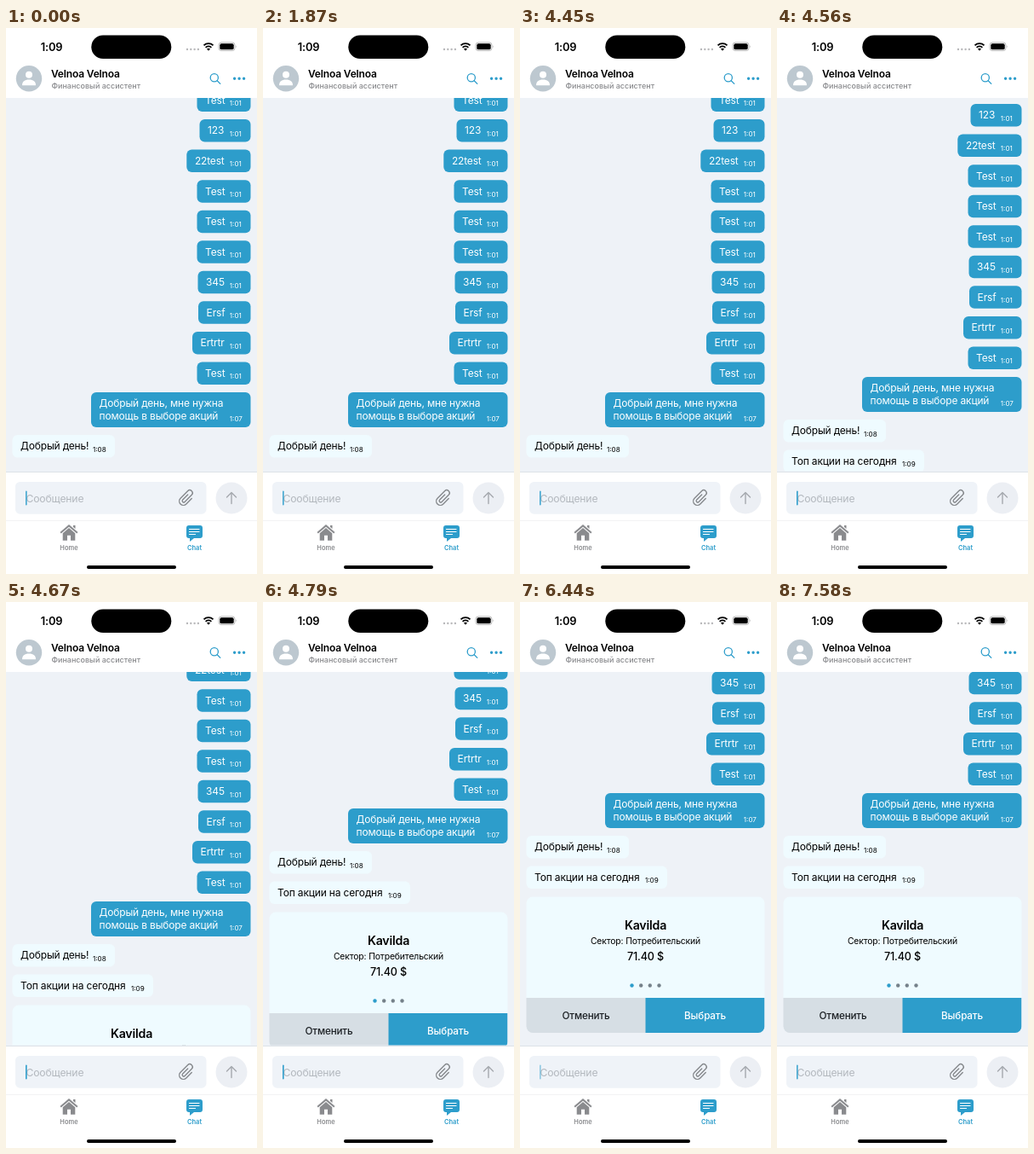
These frames come from a looping animation (295x640 px, 8 s). An HTML page:

```html
<!DOCTYPE html>
<html lang="ru">
<head>
<meta charset="utf-8">
<title>Chat</title>
<style>
  html, body { margin: 0; width: 100%; height: 100%; overflow: hidden; background: #fff; }
  svg { display: block; width: 295px; height: 640px; }
  text { font: 12px Inter, sans-serif; letter-spacing: -.014em; }
  .time { font-size: 8.1px; letter-spacing: 0; }
  .tab { font-size: 7.5px; font-weight: 600; letter-spacing: 0; }
  .mid { text-anchor: middle; }
  .medium { font-weight: 500; }
  .bold { font-weight: 600; }
  .blue { fill: #2d9dcb; }
  .pale { fill: #effbff; }
  .white { fill: #fff; }
  .grey { fill: #8a8b8e; }
  .line { fill: none; stroke-linecap: round; stroke-linejoin: round; }
</style>
</head>
<body>
<svg viewBox="0 0 295 640">
  <defs>
    <clipPath id="view"><rect y="82" width="295" height="437.5"/></clipPath>
    <clipPath id="card"><rect x="7.5" y="548.5" width="280" height="159.5" rx="7.5"/></clipPath>
  </defs>

  <rect y="82" width="295" height="438" fill="#eef2f7"/>
  <g clip-path="url(#view)">
    <g id="chat">
      <g id="bubbles"></g>
      <g id="reply">
        <g id="replyBubble"></g>
        <g clip-path="url(#card)">
          <rect class="pale" x="7" y="548" width="281" height="119"/>
          <rect x="7" y="667" width="141" height="41" fill="#d6dee4"/>
          <rect class="blue" x="147.5" y="667" width="140" height="41"/>
        </g>
        <g class="mid">
          <text class="bold" x="147.5" y="586.7" style="font-size:14.2px">Kavilda</text>
          <text x="147.5" y="604.2" style="font-size:10.4px">Сектор: Потребительский</text>
          <text class="medium" x="147.5" y="623" style="font-size:12.6px">71.40 $</text>
          <text class="medium" x="77.5" y="691.8" fill="#1b1f23" style="font-size:11.7px">Отменить</text>
          <text class="medium white" x="217.5" y="691.8" style="font-size:11.7px">Выбрать</text>
        </g>
        <g fill="#75818a">
          <circle class="blue" cx="131.5" cy="652.5" r="2.2"/>
          <circle cx="142.2" cy="652.5" r="2.2"/>
          <circle cx="152.8" cy="652.5" r="2.2"/>
          <circle cx="163.5" cy="652.5" r="2.2"/>
        </g>
      </g>
    </g>
  </g>

  <!-- Status bar -->
  <text class="bold" x="40.8" y="26.5" style="font-size:12.9px">1:09</text>
  <rect x="100.3" y="8.5" width="94" height="27.5" rx="13.75"/>
  <path class="line" d="M213 25h13" stroke="#b9b9bb" stroke-width="2.4" stroke-dasharray="0 4.3"/>
  <path d="M232.5 20.4a8 8 0 0 1 11 0M234.6 22.8a5 5 0 0 1 6.8 0" fill="none" stroke="#000" stroke-width="1.8"/>
  <path d="M236 24.6a3 3 0 0 1 4 0l-2 2.2z"/>
  <rect x="250" y="17" width="19" height="9.6" rx="3" fill="none" stroke="#aaa" stroke-width=".8"/>
  <rect x="251.3" y="18.3" width="16.4" height="7" rx="1.9"/>
  <path d="M270.3 20.2q1.4 1.6 0 3.2z" fill="#aaa"/>

  <!-- Header -->
  <circle cx="27" cy="59.3" r="15.2" fill="#bdc8d0"/>
  <circle class="white" cx="27" cy="54.8" r="4"/>
  <path class="white" d="M19 67.2c0-4.6 3-6.7 8-6.7s8 2.1 8 6.7z"/>
  <text class="bold" x="53" y="57.7">Velnoa Velnoa</text>
  <text class="grey medium" x="53.5" y="70.7" style="font-size:9px;letter-spacing:0">Финансовый ассистент</text>
  <g class="line" stroke="#2d9dcb" stroke-width="1.3">
    <circle cx="244.8" cy="58.3" r="4.6"/>
    <path d="M248.2 61.7l3.6 3.7"/>
  </g>
  <path class="line" d="M268.6 59.3h11.2" stroke="#2d9dcb" stroke-width="3.4" stroke-dasharray="0 5.5"/>

  <!-- Message field -->
  <path d="M0 520.5h295" stroke="#dce2e7"/>
  <rect x="11" y="532" width="224.5" height="37.7" rx="5.5" fill="#eff3f8"/>
  <text x="23.5" y="555.7" fill="#b3b8be" style="font-size:12.2px">Сообщение</text>
  <rect id="cursor" class="blue" x="23" y="542.5" width="1.6" height="17" rx=".8"/>
  <path class="line" transform="translate(212 551) rotate(45)" stroke="#85888c" stroke-width="1.4"
    d="M4.8 -4V5a4.8 4.8 0 0 1 -9.6 0V-7a3.3 3.3 0 0 1 6.6 0V4.5a1.7 1.7 0 0 1 -3.4 0V-4"/>
  <circle cx="265" cy="551" r="18.5" fill="#eceff4"/>
  <path class="line" d="M265 557.5v-13m-5.5 5.5l5.5-5.5 5.5 5.5" stroke="#a5a9ae" stroke-width="1.4"/>

  <!-- Tabs -->
  <path d="M0 577.5h295" stroke="#eceef0" stroke-width=".7"/>
  <g class="grey">
    <path d="M74 582l10.5 9-1.3 1.5L74 584.7l-9.2 7.8-1.3-1.5zM79 583h2.5v4l-2.5-2z"/>
    <path d="M74 586l7.3 6.2v8.6h-5.3v-6h-4v6h-5.3v-8.600z"/>
  </g>
  <path class="blue" d="M215 583h13a3 3 0 0 1 3 3v9a3 3 0 0 1-3 3h-7l-5 4v-4h-1a3 3 0 0 1-3-3v-9a3 3 0 0 1 3-3z"/>
  <path class="line" d="M215.5 587.5h11.5M215.5 590.5h11.5M215.5 593.5h7" stroke="#fff" stroke-width="1.2"/>
  <g class="mid">
    <text class="grey tab" x="74" y="611.5">Home</text>
    <text class="blue tab" x="221.5" y="611.5">Chat</text>
  </g>
  <rect x="95" y="630" width="105" height="4" rx="2"/>
</svg>

<script>
const LOOP = 8000, PITCH = 35.55, LEFT = 7.5, RIGHT = 287.5;
const byId = id => document.getElementById(id);
const chat = byId('chat'), reply = byId('reply'), cursor = byId('cursor');

const label = (x, y, text, cls = '') => `<text class="${cls}" x="${x}" y="${y}">${text}</text>`;

// A bubble grows by 14.4 px with each extra line of text
function bubble(left, right, top, lines, time, timeX, box, ink) {
  const height = 12.1 + 14.4 * lines.length;
  return `<rect class="${box}" x="${left}" y="${top}" width="${right - left}" height="${height}" rx="6"/>`
    + lines.map((text, i) => label(left + 9.6, top + 17.4 + 14.4 * i, text, ink)).join('')
    + label(timeX, top + height - 6.8, time, 'time ' + ink);
}
const sent = (left, top, lines, time) => bubble(left, RIGHT, top, lines, time, 262.8, 'blue', 'white');
const received = (right, top, text, time) =>
  bubble(LEFT, right, top, [text], time, right - 26, 'pale', '');

const tests = [['Test', 224.5], ['123', 227.5], ['22test', 212.3], ['Test', 224.5], ['Test', 224.5],
  ['Test', 224.5], ['345', 225.5], ['Ersf', 226], ['Ertrtr', 219], ['Test', 224.5]];

byId('bubbles').innerHTML =
  tests.map(([text, left], i) => sent(left, 71.5 + i * PITCH, [text], '1:01')).join('')
  + sent(100, 427, ['Добрый день, мне нужна', 'помощь в выборе акций'], '1:07')
  + received(128, 477, 'Добрый день!', '1:08');
byId('replyBubble').innerHTML = received(173, 477 + PITCH, 'Топ акции на сегодня', '1:09');

// Latest value whose start time has passed
const stepAt = (steps, t) => steps.findLast(([start]) => t >= start)[1];
const scroll = [[0, 0], [4560, 18], [4670, 76], [4790, 185], [5060, 203]];
const blink = [[0, .9], [120, 0], [360, .5], [480, .9]];

function cursorAlpha(t) {
  if (t >= 4560 && t < 5060) return 1; // the new message restarts the blink
  const phase = t < 4560 ? t - 370 : t - 5060;
  return stepAt(blink, (phase + 1020) % 1020);
}

function draw(now) {
  const t = now % LOOP;
  chat.setAttribute('transform', `translate(0 ${-stepAt(scroll, t)})`);
  reply.setAttribute('visibility', t < 4560 ? 'hidden' : 'visible');
  cursor.setAttribute('opacity', cursorAlpha(t));
  requestAnimationFrame(draw);
}
draw(performance.now());
</script>
</body>
</html>
```
